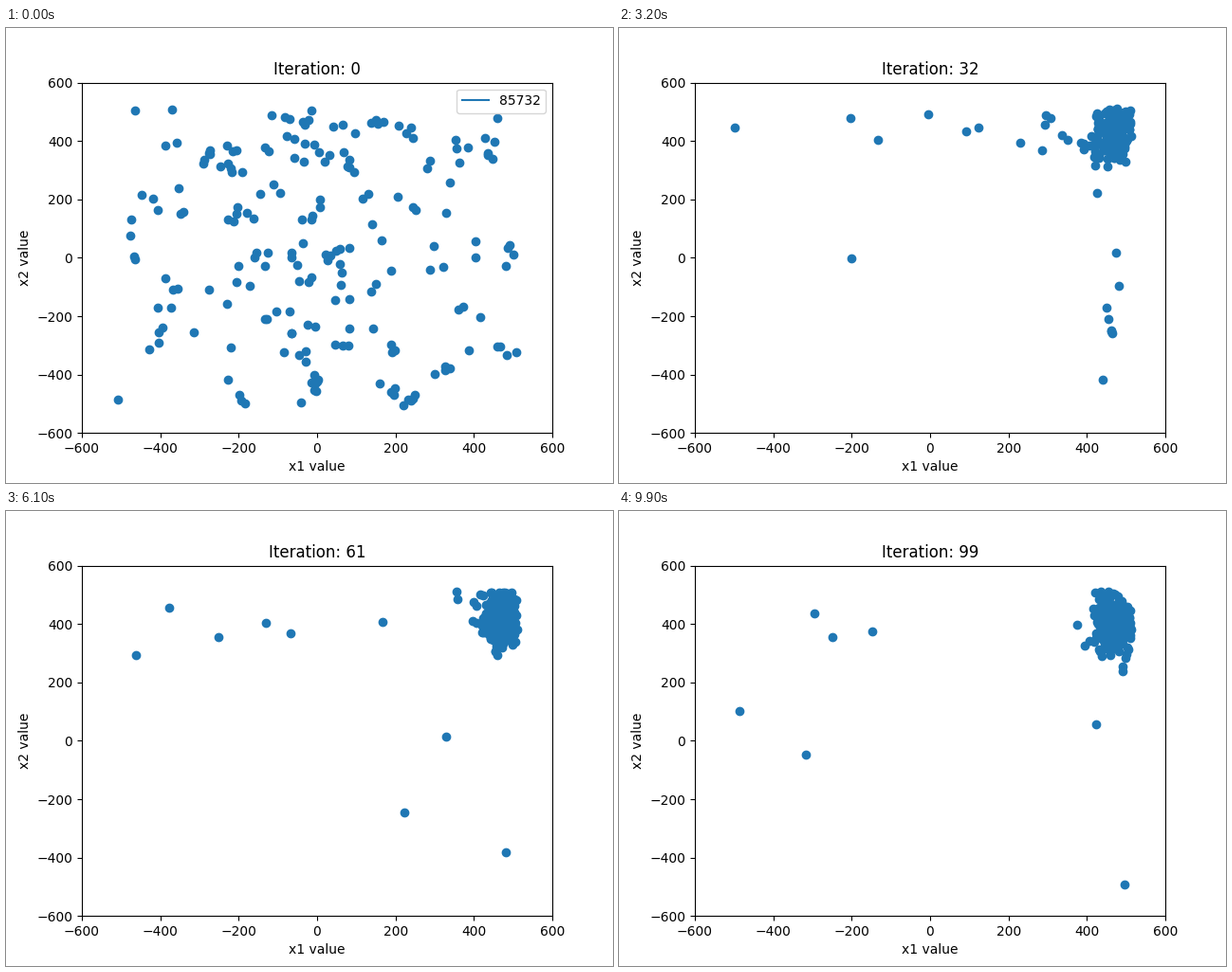
A matplotlib script that plays this animation: 640 px wide and 480 px high, repeating every 10 s.

```python
import matplotlib.pyplot as plt
import numpy as np
from matplotlib.animation import FuncAnimation

STEPS = 100
POP = 200
LOW, HIGH = -512, 512


def fold(pts):
    """Reflect values at the bounds of the search space."""
    pts = np.where(pts > HIGH, 2 * HIGH - pts, pts)
    pts = np.where(pts < LOW, 2 * LOW - pts, pts)
    return np.clip(pts, LOW, HIGH)


def first_generation(rng):
    """Uniform points, some of them with a close neighbour."""
    base = rng.uniform(LOW, HIGH, (POP * 2 // 3, 2))
    parents = rng.choice(base, POP - len(base))
    return fold(np.vstack([base, parents + rng.normal(0, 18, parents.shape)]))


def swarm(k, n, rng):
    """Cluster near the optimum, with a halo thinning to the left."""
    start = np.exp(-k / 5)
    mid = 468 - 120 * start, 436 - 0.35 * k - 80 * start
    sd = 22 + 16 * np.exp(-k / 20) + 120 * start, 48 + 0.1 * k + 110 * start
    pts = rng.normal(mid, sd, (n, 2))
    halo = rng.random(n) < 0.12
    pts[halo, 0] -= rng.exponential(32, halo.sum())
    return fold(pts)


def strays(k, rng):
    """Mutants; most keep one coordinate near the optimum."""
    share = 0.03 + 0.9 * np.exp(-k / 14)
    n = round(POP * share * rng.uniform(0.85, 1.15))
    pts = HIGH - (HIGH - LOW) * rng.random((n, 2)) ** 1.3
    near = swarm(k, n, rng)
    free = max(0.25, np.exp(-k / 5))
    pick = rng.random(n)
    keep_x = (pick > free) & (pick < free + 0.4 * (1 - free))
    keep_y = pick >= free + 0.4 * (1 - free)
    pts[keep_x, 0] = near[keep_x, 0]
    pts[keep_y, 1] = near[keep_y, 1]
    return pts


def population(k):
    rng = np.random.default_rng(500 + k)
    if k == 0:
        return first_generation(rng)
    far = strays(k, rng)[:POP]
    return np.vstack([far, swarm(k, POP - len(far), rng)])


fig, ax = plt.subplots(figsize=(6.4, 4.8), dpi=100)
ax.set(xlim=(-600, 600), ylim=(-600, 600),
       xlabel="x1 value", ylabel="x2 value")
ax.plot([], [], color="C0", label="85732")
legend = ax.legend(loc="upper right")
dots = ax.scatter([], [], color="C0")
title = ax.set_title("Iteration: 0")


def update(k):
    dots.set_offsets(population(k))
    title.set_text(f"Iteration: {k}")
    legend.set_visible(k == 0)
    return dots, title, legend


anim = FuncAnimation(fig, update, frames=STEPS, interval=100,
                     repeat=True, repeat_delay=0)
plt.show()
```
